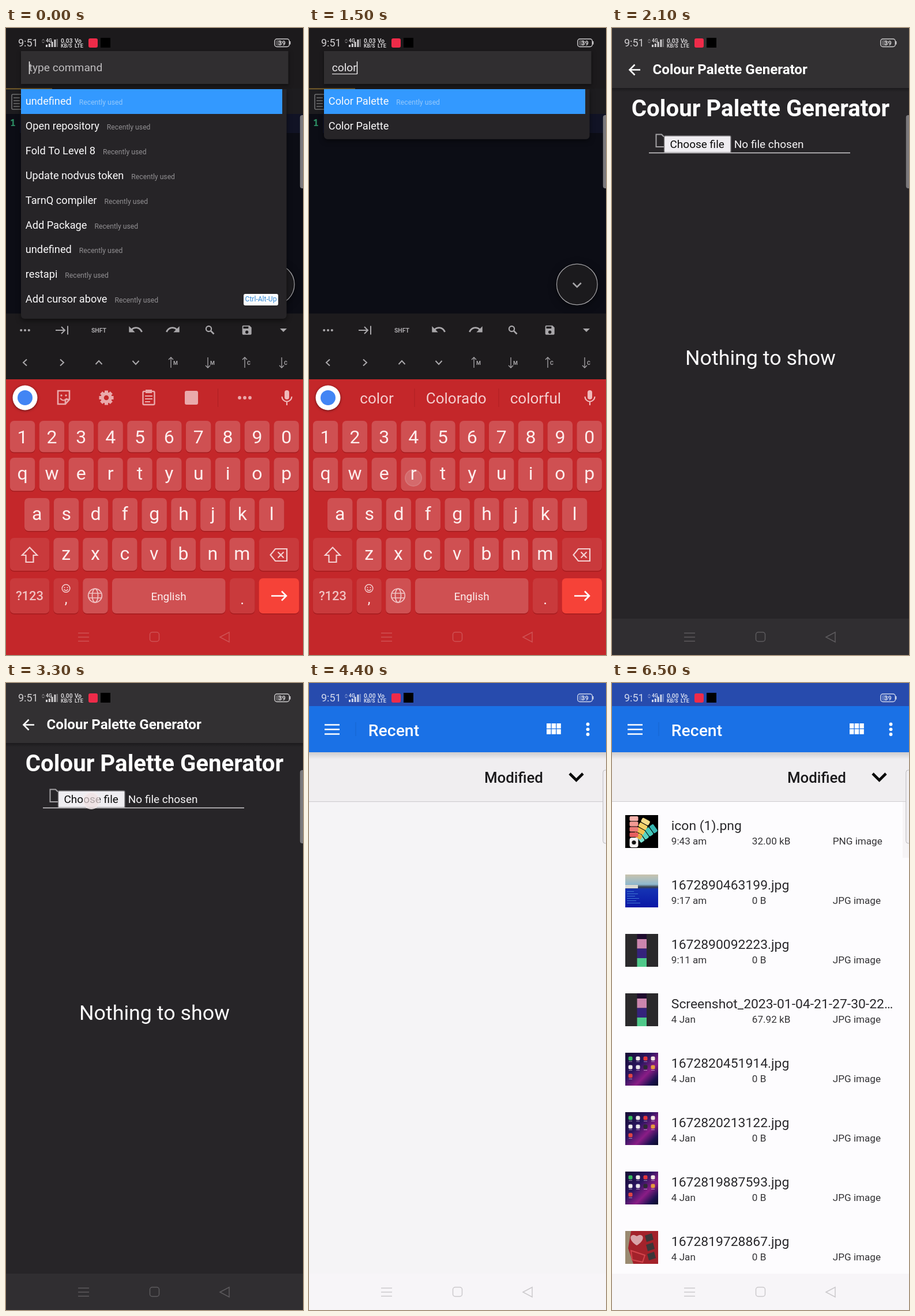
An HTML page with a canvas that plays this animation: 515x1087 px, repeating every 8 s.

```html
<!DOCTYPE html>
<html lang="en">
<head>
<meta charset="utf-8">
<title>Command palette demo</title>
<style>
html, body { margin: 0; width: 100%; height: 100%; overflow: hidden; background: #272528; }
canvas { display: block; width: 515px; height: 1087px; }
</style>
</head>
<body>
<canvas id="stage"></canvas>
<script>
const W = 515, H = 1087, LOOP = 8000, TAU = Math.PI * 2;
const cv = document.getElementById('stage');
const c = cv.getContext('2d');
const dpr = window.devicePixelRatio || 1;
cv.width = W * dpr;
cv.height = H * dpr;

// ---------- helpers ----------
function rect(x, y, w, h, fill) { c.fillStyle = fill; c.fillRect(x, y, w, h); }
function round(x, y, w, h, r, fill, stroke, lw = 1.5) {
  c.beginPath();
  c.roundRect(x, y, w, h, r);
  if (fill) { c.fillStyle = fill; c.fill(); }
  if (stroke) { c.strokeStyle = stroke; c.lineWidth = lw; c.stroke(); }
}
function disc(x, y, r, fill, stroke, lw = 1.5) {
  c.beginPath();
  c.arc(x, y, r, 0, TAU);
  if (fill) { c.fillStyle = fill; c.fill(); }
  if (stroke) { c.strokeStyle = stroke; c.lineWidth = lw; c.stroke(); }
}
function text(s, x, y, size, color, weight = 400, align = 'left', family = 'Roboto, sans-serif') {
  c.font = `${weight} ${size}px ${family}`;
  c.textAlign = align;
  c.fillStyle = color;
  c.fillText(s, x, y);
  return c.measureText(s).width;
}
function line(d, color, lw = 2, x = 0, y = 0) {
  c.save();
  c.translate(x, y);
  c.strokeStyle = color;
  c.lineWidth = lw;
  c.stroke(new Path2D(d));
  c.restore();
}
function shape(d, color, x, y, sx = 1, sy = sx) {
  c.save();
  c.translate(x, y);
  c.scale(sx, sy);
  c.fillStyle = color;
  c.fill(new Path2D(d), 'evenodd');
  c.restore();
}
function faded(alpha, draw) {
  c.save();
  c.globalAlpha *= alpha;
  draw();
  c.restore();
}
function shadow(blur, dy, draw) {
  c.save();
  c.shadowColor = 'rgba(0,0,0,.5)';
  c.shadowBlur = blur * dpr;
  c.shadowOffsetY = dy * dpr;
  draw();
  c.restore();
}

// ---------- system bars ----------
function statusBar(color, speed) {
  text('9:51', 21, 32, 18, color);
  line('M62.5 22L64.5 19.5L66.5 22M62.5 23.5L64.5 26L66.5 23.5', color, .7);
  text('4G', 69, 25, 8.5, color, 700);
  [4, 6, 9, 13].forEach((h, i) => rect(69 + i * 4.8, 33 - h, 3, h, color));
  faded(.4, () => rect(87.5, 19, 2.5, 14, color));
  text(speed, 95, 25.5, 10.2, color, 700);
  text('KB/S', 95, 33.5, 8.6, color, 700);
  text('Vo', 119, 25.5, 10, color, 700);
  text('LTE', 119, 34, 9.2, color, 700);
  battery(color);
}
function battery(color) {
  round(465.8, 19, 25.5, 13.5, 4, null, color, 1.4);
  faded(.3, () => round(468, 21, 9, 9.5, 2, color));
  rect(492, 23, 1.4, 5.5, color);
  text('39', 478.5, 29.6, 11, color, 700, 'center');
}
function appIcons() {
  round(143, 18, 16, 16, 3, '#ee2b49');
  rect(164, 17, 17, 17, '#000');
}
function navIcons(color) {
  line('M125 1049H144M125 1056H144M125 1063H144', color, 1.5);
  round(249.5, 1047.5, 16, 16, 4, null, color, 1.5);
  line('M371 1056L387 1047.5V1064.5Z', color, 1.5);
}
function edgeHandle(fill, stroke) { round(509.8, 151, 10, 127, 4, fill, stroke, 1); }

// ---------- editor ----------
const ICON = '#a9a7aa';
const UNDO = 'M12.5 8c-2.65 0-5.05 1-6.9 2.6L2 7v9h9l-3.6-3.6c1.4-1.2 3.1-1.9 5.1-1.9 3.5 0 6.5 2.3 7.6 5.5l2.4-.8C21 11 17 8 12.5 8z';
const SAVE = 'M17 3H5a2 2 0 0 0-2 2v14a2 2 0 0 0 2 2h14a2 2 0 0 0 2-2V7zM12 19a3 3 0 1 1 0-6a3 3 0 0 1 0 6zM15 9H5V5h10z';

function dots(x, y, gap, r, color) {
  for (const k of [-1, 0, 1]) disc(x + k * gap, y, r, color);
}
function toolbar() {
  rect(0, 495, W, 115, '#1d1b1d');
  dots(33, 524, 6.8, 2.1, ICON);
  line('M86 524H102M96 518L102 524L96 530M107 516.5V531.5', ICON, 2);
  text('SHFT', 161, 528, 10.5, ICON, 700, 'center');
  shape(UNDO, ICON, 211, 509, 1.15);
  shape(UNDO, ICON, 303, 509, -1.15, 1.15);
  disc(351.5, 521.5, 4.6, null, ICON, 2.2);
  line('M355 525L360.5 530.5', ICON, 2.6);
  shape(SAVE, ICON, 407, 513, .89);
  shape('M-6 -3H6L0 3Z', ICON, 481, 524);
  line('M4 -5.5L-2 0L4 5.5', ICON, 2, 32, 580);
  line('M-3 -5.5L3 0L-3 5.5', ICON, 2, 97, 580);
  line('M-5.5 3L0 -3L5.5 3', ICON, 2, 161, 580);
  line('M-5.5 -3L0 3L5.5 -3', ICON, 2, 225, 580);
  ['M', 'M', 'C', 'C'].forEach((s, i) => {
    const x = 286 + i * 64, down = i % 2;
    line('M0 -9V9', ICON, 1.3, x, 580);
    line(down ? 'M-4 5L0 9L4 5' : 'M-4 -5L0 -9L4 -5', ICON, 1.3, x, 580);
    text(s, x + 4, 584, 9, ICON, 700);
  });
}
function editor() {
  rect(0, 0, W, 105, '#1c1a1c');
  rect(0, 105, W, 44, '#1d1c1f');
  rect(0, 104.5, 80, 1.8, '#80652b');
  round(10, 115, 17, 26, 2, null, '#707072', 1.6);
  line('M13 121H24M13 126H24M13 131H24M13 136H24', '#707072', 1.5);
  rect(0, 149, W, 346, '#0c0d15');
  rect(24, 149, W - 24, 33, '#111325');
  text('1', 7, 170, 16.5, '#2c8c62', 700, 'left', '"Noto Sans Mono", monospace');
  shadow(14, 3, () => disc(464.8, 444.5, 35.3, '#1b1a1d'));
  disc(464.8, 444.5, 35.3, null, '#a5a4a7', 1.2);
  line('M-7 -3.5L0 3.5L7 -3.5', '#a5a4a7', 2.6, 464.8, 445.5);
  toolbar();
}

// ---------- command palette ----------
const RECENT = ['undefined', 'Open repository', 'Fold To Level 8', 'Update nodvus token',
  'TarnQ compiler', 'Add Package', 'undefined', 'restapi', 'Add cursor above'];

function results(query) {
  const row = (name, recent) => ({ name, recent });
  if (!query) return RECENT.map(n => row(n, true));
  const rest = RECENT.filter(n => n.toLowerCase().includes(query));
  return [row('Color Palette', true), ...rest.map(n => row(n, true)), row('Color Palette', false)];
}
function palette(query) {
  const rows = results(query), step = 42.9;
  const h = query ? rows.length * step + 1 : 398;
  shadow(8, 3, () => round(26, 106, 460.5, h, [0, 0, 6, 6], '#262427'));
  shadow(6, 2, () => rect(26, 40, 463.5, 57, '#302e30'));
  if (query) {
    const w = text(query, 39.7, 75, 19.2, '#eceaec');
    rect(40, 79, w, 1.3, '#d8d6d8');
    rect(39.7 + w, 58, 1.4, 22, '#fff');
  } else {
    text('type command', 39.7, 75, 19.2, '#bebcbe');
    rect(39.8, 58, 1.4, 22, '#fff');
  }
  rect(26, 106, 453, 43, '#3399ff');
  rows.forEach((r, i) => {
    const y = 133 + i * step;
    const w = text(r.name, 33.8, y, 18.2, '#fbfafb');
    if (r.recent) text('Recently used', 33.8 + w + 13, y, 12.2, i ? '#918f92' : '#94c8fb');
    if (r.name === 'Add cursor above') {
      round(412, y - 15.2, 60, 20, 3, '#fdfdfe');
      text('Ctrl-Alt-Up', 442, y - 2, 12.1, '#3489d4', 400, 'center');
    }
  });
}

// ---------- keyboard ----------
const SOFT = '#eaa9ab';
const KEY = 'rgba(255,255,255,.19)', DARK_KEY = 'rgba(255,255,255,.085)';
const SUGGEST = {
  c: ['c', 'can', 'call'], co: ['co', 'come', 'could'], col: ['col', 'collapse', 'college'],
  colo: ['colo', 'color', 'Colorado'], color: ['color', 'Colorado', 'colorful']
};

function key(x, y, w, h, fill = KEY) {
  round(x, y + 1.5, w, h, 7, 'rgba(90,0,0,.3)');
  round(x, y, w, h, 7, '#c4272a');
  round(x, y, w, h, 7, fill);
}
function keyRow(chars, x, y, h, base) {
  [...chars].forEach((ch, i) => {
    const kx = x + i * 50.85;
    key(kx, y, 43.5, h);
    text(ch, kx + 21.8, y + base, 32, '#fdeeee', 400, 'center');
  });
}
function gear(x, y) {
  for (let i = 0; i < 8; i++) {
    c.save();
    c.translate(x, y);
    c.rotate(i * TAU / 8);
    rect(-3, -12.5, 6, 6, SOFT);
    c.restore();
  }
  disc(x, y, 7, null, SOFT, 5.5);
}
function keyTools() {
  line('M90 629H110V644L103 652H90ZM110 644H103V652', SOFT, 2.6);
  disc(96, 637, 1.7, SOFT);
  disc(104, 637, 1.7, SOFT);
  line('M94 642Q100 649 106 642', SOFT, 2);
  gear(174, 641);
  round(237.5, 630, 20, 23, 2, null, SOFT, 2.4);
  rect(242, 627, 11, 6, SOFT);
  line('M241 638H254M241 643H254M241 648H250', SOFT, 2);
  round(310, 629, 23, 24, 3, SOFT);
  rect(367, 625, 1, 32, 'rgba(80,0,0,.18)');
  dots(414, 641, 9, 2.9, SOFT);
}
function keyboard(query, dy) {
  rect(0, 609 + dy, W, H, '#c4272a');
  c.save();
  c.translate(0, dy);
  shadow(4, 1, () => disc(33, 641, 21.5, '#fff'));
  disc(33, 641, 13, '#4285f4');
  if (query) {
    SUGGEST[query].forEach((s, i) => text(s, 117.5 + i * 137.7, 651, 26, '#f4cdce', 400, 'center'));
    rect(182.5, 625, 1, 32, 'rgba(80,0,0,.18)');
    rect(328.5, 625, 1, 32, 'rgba(80,0,0,.18)');
  } else keyTools();
  round(483, 628, 8, 16, 4, '#efb9ba');
  line('M478.5 639A8.5 8.5 0 0 0 495.5 639M487 647.5V654', '#efb9ba', 2.2);

  keyRow('1234567890', 6.8, 681, 54.5, 39);
  keyRow('qwertyuiop', 6.8, 745, 57.5, 38);
  keyRow('asdfghjkl', 32, 815, 57, 37.5);
  keyRow('zxcvbnm', 82.3, 884, 57, 37.5);
  key(6.8, 884, 68.5, 57, DARK_KEY);
  key(438.6, 884, 69.5, 57, DARK_KEY);
  line('M41 900.5L54 914H47.5V926H34.5V914H28Z', '#f4cfd0', 2.2);
  line('M467 903H487V924H467L458.5 913.5ZM471.5 908.5L481.5 918.5M481.5 908.5L471.5 918.5', '#f4cfd0', 2.2);

  key(6.8, 954, 68.5, 61, DARK_KEY);
  key(82.3, 954, 43.5, 61, DARK_KEY);
  key(133.2, 954, 43.5, 61);
  key(184, 954, 196.5, 61);
  key(388, 954, 43.5, 61, DARK_KEY);
  key(438.6, 954, 69.5, 61, '#f64238');
  text('?123', 41, 992, 22, '#f0c0c1', 500, 'center');
  disc(104, 971.5, 6.8, null, '#f4cfd0', 1.5);
  disc(101.5, 970, 1, '#f4cfd0');
  disc(106.5, 970, 1, '#f4cfd0');
  line('M100.5 973Q104 977.5 107.5 973', '#f4cfd0', 1.3);
  text(',', 104, 998, 24, '#fdeeee', 400, 'center');
  disc(154.5, 984, 11.8, null, '#f0c3c4', 1.7);
  c.beginPath();
  c.ellipse(154.5, 984, 5, 11.8, 0, 0, TAU);
  c.stroke();
  line('M143.5 980H165.5M143.5 988H165.5', '#f0c3c4', 1.6);
  text('English', 282, 991.5, 18.9, '#fdeeee', 400, 'center');
  text('.', 409.7, 999, 26, '#fdeeee', 400, 'center');
  line('M460 984.5H486M478 976.5L486 984.5L478 992.5', '#fff', 2.6);
  c.restore();
  navIcons('rgba(255,255,255,.2)');
}

// ---------- colour palette page ----------
function page(dx, dy, alpha) {
  const title = 'Colour Palette Generator';
  rect(0, 0, W, H, '#323032');
  c.save();
  c.translate(dx, dy);
  faded(Math.min(1, alpha * 2.4), () => {
    rect(-dx, 104, W, H, '#272528');
    const g = c.createLinearGradient(0, 104, 0, 111);
    g.addColorStop(0, 'rgba(0,0,0,.3)');
    g.addColorStop(1, 'rgba(0,0,0,0)');
    rect(-dx, 104, W, 7, g);
  });
  faded(alpha, () => {
    line('M49 72.5H31M39.5 63.5L30.5 72.5L39.5 81.5', '#fff', 2.6);
    text(title, 70.5, 80, 24.1, '#fff', 700);
    text(title, 257.5, 153, 40.2, '#fff', 700, 'center');
    line('M90 206H76.5V184.5H86L90 188.5', '#a3a1a4', 2);
    round(90.5, 187, 115.5, 29, 2, '#efedf1', '#767477', 1.4);
    text('Choose file', 100.5, 208, 19, '#0a0a0a');
    text('No file chosen', 211.8, 208, 19, '#f6f5f6');
    rect(64, 215.8, 349, 1.4, '#dad8db');
    text('Nothing to show', 257.5, 584, 35.8, '#fbfafb', 400, 'center');
  });
  c.restore();
  rect(0, 1024, W, 63, '#302e31');
  navIcons('#5d5b5e');
}
function panel(x) {
  c.save();
  c.beginPath();
  c.rect(x, 0, W - x, H);
  c.clip();
  rect(0, 0, W, H, '#f0eef1');
  text('9:51', 21, 32, 18, '#fbfafb');
  battery('#fcfbfc');
  navIcons('#eae8eb');
  c.restore();
}

// ---------- file picker ----------
const FILES = [
  ['icon (1).png', '9:43 am', '32.00 kB', 'PNG image', swatches],
  ['1672890463199.jpg', '9:17 am', '0 B', 'JPG image', desk],
  ['1672890092223.jpg', '9:11 am', '0 B', 'JPG image', strips],
  ['Screenshot_2023-01-04-21-27-30-22…', '4 Jan', '67.92 kB', 'JPG image', strips],
  ['1672820451914.jpg', '4 Jan', '0 B', 'JPG image', launcher],
  ['1672820213122.jpg', '4 Jan', '0 B', 'JPG image', launcher],
  ['1672819887593.jpg', '4 Jan', '0 B', 'JPG image', launcher],
  ['1672819728867.jpg', '4 Jan', '0 B', 'JPG image', gift]
];

// thumbnails live in a 57 x 57 box
function swatches() {
  rect(0, 0, 57, 57, '#000');
  const fan = (angle, cols) => {
    c.save();
    c.translate(15, 48);
    c.rotate(angle);
    cols.forEach((col, i) => round(-7.5, -46 + i * 9.3, 15, 8.2, 2, col));
    c.restore();
  };
  fan(.95, ['#35b5b0', '#45c9bb', '#57d5c3', '#7be0d0']);
  fan(.5, ['#f6dc8a', '#f3cf66', '#f0c04e', '#e9ad3c']);
  fan(0, ['#f7b3ad', '#f39a94', '#ee7b78', '#e55f60']);
  round(7.5, 39, 15, 17, 4, '#f3f1f1');
  disc(15, 47.5, 3.6, '#111');
}
function desk() {
  const g = c.createLinearGradient(0, 0, 0, 57);
  [['#c9c3ad', 0], ['#8fb9cf', .3], ['#39424f', .38], ['#1533b4', .45], ['#0a17a6', 1]]
    .forEach(([col, p]) => g.addColorStop(p, col));
  rect(0, 0, 57, 57, g);
  rect(0, 18, 22, 6, '#d9d9d2');
  for (let i = 0; i < 6; i++) rect(3, 29 + i * 4, 12 + (i * 7) % 12, 1, '#3f78d0');
}
function strips() {
  rect(0, 0, 57, 57, '#2a292b');
  rect(20.5, 0, 16.5, 9, '#1f0d2e');
  rect(20.5, 9, 16.5, 16.5, '#cb86ae');
  rect(20.5, 25.5, 16.5, 16.5, '#35237c');
  rect(20.5, 42, 16.5, 15, '#4fc98a');
}
function launcher() {
  const g = c.createLinearGradient(0, 0, 57, 57);
  [['#140c33', 0], ['#2b1560', .4], ['#8a1d86', .65], ['#1c1150', .85], ['#0a0b26', 1]]
    .forEach(([col, p]) => g.addColorStop(p, col));
  rect(0, 0, 57, 57, g);
  ['#35b85c', '#efe9ea', '#e2373c', '#f1e6e2', '#f3f0f0', '#e8e6ea', '#2c2a33', '#e49a3c', '#e04444']
    .forEach((col, i) => {
      const x = 9 + (i % 4) * 13, y = 10 + Math.floor(i / 4) * 15;
      round(x - 3.5, y - 3.5, 7, 7, 2, col);
      rect(x - 3, y + 5, 6, .8, 'rgba(255,255,255,.6)');
    });
}
function gift() {
  rect(0, 0, 57, 57, '#a3222b');
  shape('M0 0H10L5 30L14 57H0Z', '#9a8a70', 0, 0);
  shape('M20 25C2 14 10 2 20 9C30 2 38 14 20 25Z', '#d8a3a8', 0, 0);
  shape('M34 8L46 4L49 15L37 19ZM36 24L48 20L51 31L39 35ZM38 40L50 36L53 47L41 51Z', '#3c3638', 0, 0);
  line('M10 34L34 42L30 54L12 50Z', '#d2454c', 2);
}
function fileBar() {
  rect(0, 0, W, 40, '#274bad');
  rect(0, 40, W, 80, '#1a71e6');
  line('M27 72.5H53M27 80.5H53M27 88.5H53', '#fff', 2.7);
  rect(80.5, 68, 1, 24, '#1764ce');
  text('Recent', 102.8, 91.5, 28.4, '#fff', 500);
  for (let i = 0; i < 6; i++) rect(412 + (i % 3) * 8.7, 70 + (i > 2 ? 10 : 0), 7.4, 8.8, '#fff');
  for (const y of [71.5, 80.3, 89]) disc(483.5, y, 2.9, '#fff');
  rect(0, 120, W, 85, '#f0eef0');
  const g = c.createLinearGradient(0, 120, 0, 132);
  g.addColorStop(0, 'rgba(0,0,0,.14)');
  g.addColorStop(1, 'rgba(0,0,0,0)');
  rect(0, 120, W, 12, g);
  text('Modified', 304, 173, 25.8, '#1b1a1c', 500);
  line('M452 157L463.5 168.5L475 157', '#0a0a0a', 4.6);
  rect(0, 205, W, 1.2, '#cfcdd0');
}
function fileRows() {
  rect(0, 206, W, 818, '#fdfcfe');
  rect(504, 206, 11, 97, '#f6f4f6');
  FILES.forEach(([name, time, size, kind, thumb], i) => {
    const y = i * 103;
    c.save();
    c.translate(23, 229 + y);
    c.beginPath();
    c.rect(0, 0, 57, 57);
    c.clip();
    thumb();
    c.restore();
    text(name, 102.8, 255 + y, 22.9, '#29282b');
    text(time, 102.8, 280 + y, 17.1, '#343336');
    text(size, 242.8, 280 + y, 17.1, '#343336');
    text(kind, 382.8, 280 + y, 17.1, '#343336');
  });
}
function picker(t) {
  faded(clamp((t - 4000) / 400), () => {
    rect(0, 0, W, H, '#f5f4f6');
    fileBar();
    rect(0, 1024, W, 63, '#f7f5f8');
    navIcons('#cbc9cc');
  });
  const a = clamp((t - 4600) / 400);
  if (a > 0) faded(a, fileRows);
}

// ---------- timeline ----------
const TAPS = [
  { at: 100, x: 205, y: 915, ch: 'c' },
  { at: 400, x: 430, y: 790, ch: 'o' },
  { at: 700, x: 475, y: 872, ch: 'l' },
  { at: 900, x: 428, y: 797, ch: 'o' },
  { at: 1300, x: 181, y: 780, ch: 'r' },
  { at: 1700, x: 473, y: 978 },
  { at: 3300, x: 148, y: 204 }
];

function clamp(v) { return Math.max(0, Math.min(1, v)); }
function taps(t) {
  for (const { at, x, y } of TAPS) {
    const age = t - at;
    if (age < 0 || age > 200) continue;
    faded(age < 200 ? 1 : .25, () => {
      disc(x, y, 15, 'rgba(240,225,226,.72)');
      disc(x, y, 14, null, 'rgba(255,255,255,.35)', 2);
    });
  }
}
function draw(t) {
  c.setTransform(dpr, 0, 0, dpr, 0, 0);
  const query = TAPS.filter(p => p.ch && t >= p.at + 100).map(p => p.ch).join('');
  const speed = t < 3100 ? '0.03' : '0.00';

  if (t < 1800) {
    editor();
    palette(query);
    keyboard(query, 0);
  } else if (t < 4400) {
    const u = clamp((t - 1800) / 300);
    const x = t < 3500 ? W : W * (1 - clamp((t - 3440) / 460)) ** 2.63;
    page(-.063 * (W - x), 444 * (1 - u) ** 1.71, u ** 1.3);
    if (t < 2100) keyboard(query, t < 1900 ? 0 : 2 + 2.6 * (t - 1900));
    if (x < W) {
      rect(0, 0, x, H, 'rgba(0,0,0,.06)');
      statusBar('#c9c7ca', speed);
      panel(x);
    }
  }
  if (t > 4000) picker(t);

  if (t < 3500) statusBar('#d0ced0', speed);
  else if (t > 4000) faded(clamp((t - 4000) / 400), () => statusBar('#ced6ec', speed));
  appIcons();
  if (t < 3500) edgeHandle('#7b797c');
  else edgeHandle('#f1eff2', '#bdbbbe');
  taps(t);
}

const start = performance.now();
function tick(now) {
  const t = Math.max(0, now - start) % LOOP;
  draw(Math.floor(t / 100) * 100);
  requestAnimationFrame(tick);
}
draw(0);
requestAnimationFrame(tick);
</script>
</body>
</html>
```
